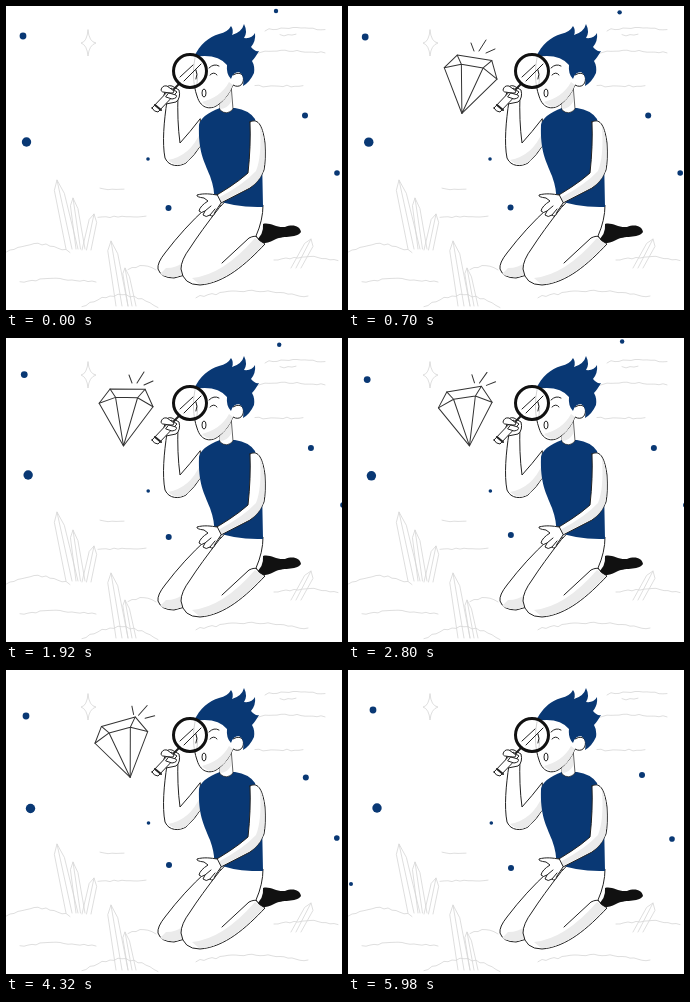
An HTML page for the animation above (6000 ms loop, 336 by 304 pixels).

```html
<!DOCTYPE html>
<html lang="en">
<head>
<meta charset="utf-8">
<title>Looking closely</title>
<style>
html, body { margin: 0; width: 100%; height: 100%; overflow: hidden; background: #fff }
svg { display: block; width: 336px; height: 304px }
path { stroke-linecap: round; stroke-linejoin: round }
#land { fill: none; stroke: #d6d6d6; stroke-width: .8 }
#gem { fill: none; stroke: #333 }
.line { fill: none; stroke: #222 }
.skin { fill: #fff; stroke: #222 }
.shade { fill: #ebebeb }
.blue { fill: #093874 }
</style>
</head>
<body>
<svg viewBox="0 0 336 304">
  <g id="land">
    <path d="M82 24Q83 36 90 37Q83 39 82 50Q81 39 75 37Q81 36 82 24Z"/>
  </g>

  <g id="gem">
    <g id="stone">
      <path fill="#fff" d="M102 52L137 50L146 67L119 108L92 67Z"/>
      <path d="M92 67L108 60L130 59L146 67M102 52L108 60L119 108L130 59L137 50"/>
    </g>
    <path id="rays" d="M123 37L126 45M131 45L138 34M138 47L147 43"/>
  </g>

  <!-- legs and shoe -->
  <path fill="#111" d="M249 235Q258 229 257 218C264 216 270 222 279 221C287 218 294 220 295 226C290 233 276 229 268 234Q260 238 254 237Z"/>
  <path class="skin" d="M200 202Q178 222 159 247Q151 257 152 263Q155 272 168 272L190 266L224 199Z"/>
  <path class="shade" d="M160 262Q171 262 177 256L176 269Q165 274 154 268Z"/>
  <path class="skin" d="M213 202Q195 225 184 242Q175 254 175 263Q177 279 194 279C219 277 240 258 259 238Q253 236 250 230Q257 214 257 199L222 193Z"/>
  <path class="shade" d="M186 272Q217 269 249 232L258 238Q219 279 193 278Z"/>
  <path class="line" d="M216 257L243 232Q249 229 251 231"/>

  <!-- raised arm -->
  <path class="skin" d="M194 113Q184 126 174 137Q171 115 172 88L161 95C158 115 156 137 159 152C163 161 173 161 180 157Q189 149 195 139Z"/>
  <path class="shade" d="M194 127Q184 150 162 154Q172 163 182 155L195 139Z"/>

  <!-- torso -->
  <path class="blue" d="M214 102Q195 109 193 119C192 145 198 155 204 170Q209 184 208 193Q229 202 257 201L256 150L249 113Q243 104 229 102Z"/>
  <path class="skin" d="M244 116C253 111 257 122 259 137Q260 154 258 164Q253 176 244 182L211 199L204 193C216 186 231 177 242 167Q245 140 244 116Z"/>
  <path class="shade" d="M254 121Q256 150 250 165Q238 178 214 191L211 198L244 181Q257 173 258 160Q260 130 254 121Z"/>
  <path class="skin" d="M211 189C205 188 198 187 191 189Q190 191 198 192L202 195Q194 200 193 205Q195 208 199 205L197 209Q200 212 204 209Q207 212 209 206L215 197Z"/>
  <path class="line" d="M199 205L205 200M204 209L209 203"/>

  <!-- head -->
  <path class="skin" stroke-width=".7" d="M214 88V104Q221 110 227 103L225 78Z"/>
  <path class="shade" d="M214 96Q221 91 225 82V96Q221 103 214 103Z"/>
  <path class="skin" d="M190 48C186 62 187 79 191 90C195 104 206 104 213 98Q222 91 227 79C234 83 239 77 237 70Q234 65 227 69L222 50L206 42Z"/>
  <path class="shade" d="M196 96Q215 91 223 76L227 79Q221 95 207 101Q200 101 196 96Z"/>
  <path class="blue" d="M188 51C194 38 203 31 213 28Q222 26 225 20Q228 24 226 29Q236 26 238 18Q242 26 238 32Q246 33 249 27Q250 35 245 41Q249 46 253 45Q249 52 246 55Q249 60 248 67Q244 76 237 80Q239 69 233 66Q227 66 225 73Q220 68 221 59Q211 47 188 51Z"/>
  <path class="line" d="M204 69Q208 65 211 69M203 62Q208 57 213 60M190 63Q193 70 191 78"/>
  <ellipse class="line" cx="198" cy="87" rx="2" ry="4"/>

  <!-- magnifier and hand -->
  <path class="skin" d="M159 86Q160 78 166 80L173 84Q175 92 170 96L160 98Q156 92 159 86Z"/>
  <path class="skin" d="M146 102L165 82L171 86L152 106Q148 106 146 102Z"/>
  <path class="line" d="M149 99L155 104M168 83L174 77" stroke-width="2"/>
  <path class="skin" d="M155 84Q156 79 161 80L168 85Q168 88 164 87L157 86ZM163 87L170 89Q172 92 166 93L160 91Z"/>
  <circle cx="184" cy="65" r="16.5" fill="#fff" fill-opacity=".8" stroke="#111" stroke-width="3"/>
  <path class="line" d="M174 71L187 59M178 75L195 58M190 64Q192 68 190 73"/>

  <g id="dots" class="blue"></g>
</svg>
<script>
const LOOP = 6000;
const $ = id => document.getElementById(id);

function add(parent, tag, attrs) {
  const el = document.createElementNS('http://www.w3.org/2000/svg', tag);
  for (const name in attrs) el.setAttribute(name, attrs[name]);
  return $(parent).appendChild(el);
}

let seed = 7;
const random = () => (seed = seed * 16807 % 2147483647) / 2147483647;

// Ragged horizontal line, optionally arched
function ridge(x, y, width, arch = 0) {
  let d = '';
  for (let s = 0; s <= width; s += 4) {
    const lift = arch * Math.sin(Math.PI * s / width) + random() * 2;
    d += `${d ? 'L' : 'M'}${x + s} ${y - lift}`;
  }
  add('land', 'path', { d });
}

// Pointed prism with one inner edge, from a base of the given width
function crystal(x, y, tipX, tipY, width) {
  const dx = (x - tipX) * .15, neck = tipY + (y - tipY) * .15;
  const left = tipX + dx - width / 3, right = tipX + dx + width / 2;
  add('land', 'path', { d: `M${x} ${y}L${left} ${neck}L${tipX} ${tipY}L${right} ${neck + 3}L${x + width} ${y}M${tipX} ${tipY}L${x + width / 2} ${y}` });
}

// Clouds, then ground
ridge(259, 25, 60, 2); ridge(274, 30, 16);
ridge(247, 48, 72, 2); ridge(249, 81, 48);
ridge(94, 184, 24); ridge(92, 212, 48);
ridge(0, 247, 64, 8); ridge(14, 277, 76, 3);
ridge(76, 302, 76, 12); ridge(122, 264, 28, 3);
ridge(190, 292, 112, 6); ridge(268, 256, 66, 4);

crystal(60, 243, 51, 174, 12);
crystal(70, 243, 67, 192, 9);
crystal(76, 244, 88, 208, 9);
crystal(110, 300, 105, 235, 12);
crystal(122, 300, 119, 262, 8);
crystal(285, 262, 305, 233, 10);

const clamp = v => Math.max(0, Math.min(1, v));
const ease = v => (1 - Math.cos(Math.PI * clamp(v))) / 2;
const mix = (a, b, k) => a + (b - a) * k;

// Each dot eases from its start to a turning point, then on to its end
const LATE = .72, MID = .43;
const dots = [
  [3.4, LATE, [17, 30], [20, 46], [25, 40]],
  [4.7, LATE, [20.5, 136], [24.5, 138.5], [29, 138]],
  [1.8, LATE, [142, 153], [142.5, 153], [143.3, 153]],
  [3, LATE, [162.5, 202], [163, 195], [163, 198]],
  [2.2, .22, [270, 5], [273, 7.5], [278, -10]],
  [3, MID, [299, 109.5], [306, 110], [294, 105]],
  [2.8, MID, [331, 167], [338, 167], [324, 169]],
  [2, LATE, [-5, 212], [-4, 211], [3, 214]]
].map(([r, turn, ...points]) => ({ el: add('dots', 'circle', { r }), turn, points }));

function draw(now) {
  const t = now % LOOP, u = t / LOOP;
  for (const { el, turn, points } of dots) {
    const leg = u < turn ? 0 : 1;
    const k = ease(leg ? (u - turn) / (1 - turn) : u / turn);
    const [from, to] = points.slice(leg);
    el.setAttribute('cx', mix(from[0], to[0], k));
    el.setAttribute('cy', mix(from[1], to[1], k));
  }
  const tilt = mix(12.5, -12.5, ease((t - 500) / 3500));
  const turn = mix(0, 9, ease((t - 1900) / 2400));
  $('stone').setAttribute('transform', `rotate(${tilt} 119 84)`);
  $('rays').setAttribute('transform', `rotate(${turn} 130 55)`);
  $('gem').setAttribute('opacity', Math.min(clamp(t / 600), clamp((5960 - t) / 560)));
}

const start = performance.now();
function tick() {
  draw(performance.now() - start);
  requestAnimationFrame(tick);
}
tick();
</script>
</body>
</html>
```
